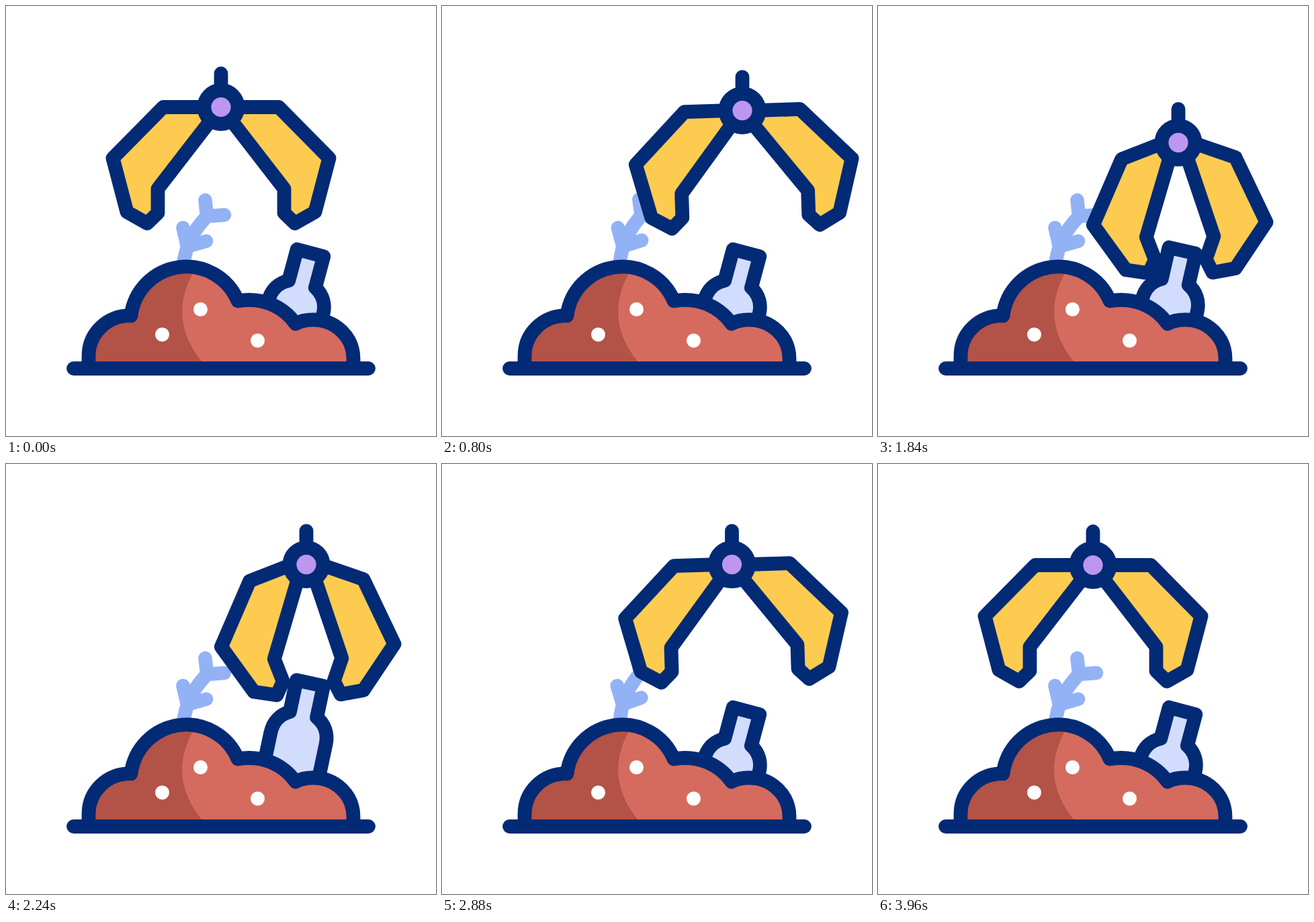
Recreate the animation shown at these times as an HTML page. Size 640x640 px, loop 4 s.

```html
<!DOCTYPE html>
<html lang="en">
<head>
<meta charset="utf-8">
<title>Claw and waste heap</title>
<style>
  html, body { margin: 0; width: 100%; height: 100%; overflow: hidden; background: #fff; }
  svg { display: block; width: 100vw; height: 100vh; }
  .line { stroke: #032a75; stroke-width: 20.8; stroke-linecap: round; stroke-linejoin: round; }
</style>
</head>
<body>
<svg viewBox="0 0 640 640">
  <defs>
    <path id="arm" class="line" fill="#fdcb50"
      d="M0 0H-86L-161 76L-140 156L-110 173L-94 157.500V121.500Z"/>
    <path id="heap" d="M123 535V521C123 487 151 460 186 461A83 83 0 0 1 345 439
      C380 433 412 446 431 473C438 469 447 467 457 467C490 467 517 492 517 525V535"/>
    <clipPath id="heapClip"><use href="#heap"/></clipPath>
  </defs>

  <path id="twig" fill="none" stroke="#93b2f5" stroke-width="20.500" stroke-linecap="round" stroke-linejoin="round"
    d="M262 395Q265 375 270 358C275 343 285 328 299 313L325 311M296.500 289L299 313M263.500 330L270 358L298 350"/>

  <g id="claw">
    <g id="leftArm"><use href="#arm"/></g>
    <g id="rightArm"><use href="#arm" transform="scale(-1 1)"/></g>
    <path class="line" d="M0 -50V-25"/>
    <circle class="line" r="25" fill="#bd97ef"/>
  </g>

  <path id="bottle" class="line" fill="#d2dcfd"
    d="M-20.500 0H20.500V48C34 55 42 68 42 84V150H-42V84C-42 68 -34 55 -20.500 48Z"/>

  <use href="#heap" fill="#d56b5e"/>
  <path clip-path="url(#heapClip)" fill="#b35247"
    d="M100 380H288L278 398C255 440 255 485 292 530V540H100Z"/>
  <use href="#heap" class="line" fill="none"/>
  <path class="line" d="M100.500 539.500H539.500"/>
  <g fill="#fff">
    <circle cx="289.500" cy="451.500" r="10.500"/>
    <circle cx="232.500" cy="489" r="10.500"/>
    <circle cx="374.500" cy="498" r="10.500"/>
  </g>
</svg>
<script>
const LOOP = 4000, RETURN = 2750;
const place = (id, transform) => document.getElementById(id).setAttribute('transform', transform);

// Smooth 0 to 1 between two times.
function ease(t, from, to) {
  const u = Math.min(1, Math.max(0, (t - from) / (to - from)));
  return u * u * (3 - 2 * u);
}

// Rises at one time span and falls back at another.
const hold = (t, on, off, span) => ease(t, on, on + span) - ease(t, off, off + span);

// Leans by `trail` until `lag`, recoils the other way until `back`, then rests.
const sway = (t, trail, recoil, lag, back, rest) =>
  trail * ease(t, 0, lag) - (trail + recoil) * ease(t, lag, back) + recoil * ease(t, back, rest);

const clawSway = t => sway(t, 7, 4.5, 400, 700, 880);
const twigSway = t => sway(t, 7, 5.5, 300, 600, 950);

function draw(t) {
  const travel = hold(t, 0, RETURN, 600);
  const closed = hold(t, 1250, 2250, 500);
  const lift = hold(t, 1750, 2250, 500);
  const nudge = hold(t, 1500, 2250, 250);
  const drop = 58 * ease(t, 690, 1300) - 59 * ease(t, 1750, 2250) + ease(t, RETURN, RETURN + 600);
  const swing = clawSway(t) - clawSway(t - RETURN);

  place('claw', `translate(${320 + 127 * travel} ${150.5 + drop})`);
  place('leftArm', `rotate(${swing - 21.3 * closed} -20 8)`);
  place('rightArm', `rotate(${swing + 19.1 * closed} 20 8)`);
  place('twig', `rotate(${twigSway(t) - 1.3 * twigSway(t - RETURN)} 264 374)`);
  place('bottle', `translate(${453 - 0.5 * lift} ${367.5 - 41.5 * lift}) rotate(${15 - 2 * nudge - lift})`);
}

const start = performance.now();
function frame() {
  draw((performance.now() - start) % LOOP);
  requestAnimationFrame(frame);
}
frame();
</script>
</body>
</html>
```
